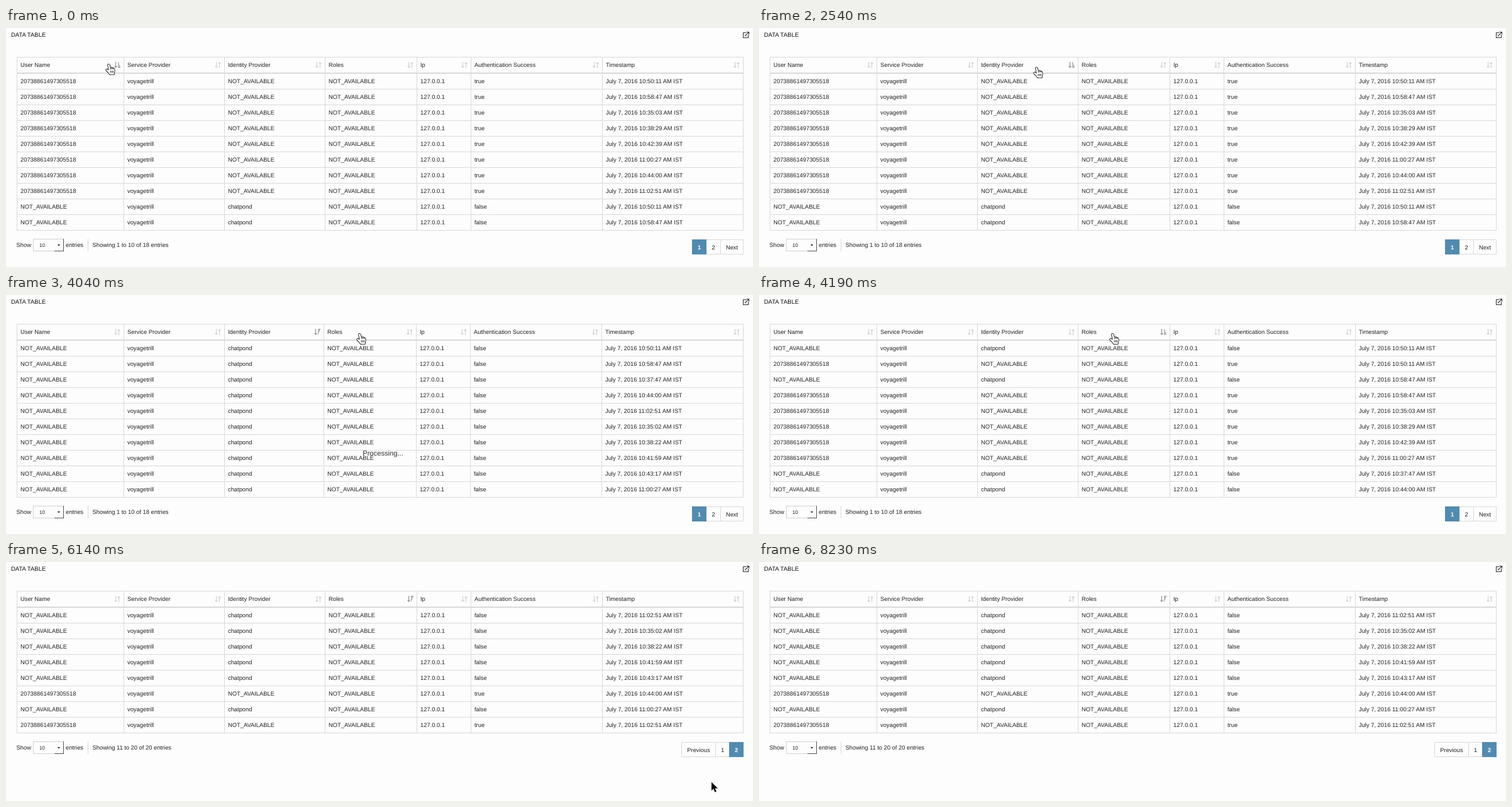
Write an HTML page with a canvas that moves like this. It is 1188 px wide and 381 px high and loops after 8530 ms.

```html
<!DOCTYPE html>
<html lang="en">
<head>
<meta charset="utf-8">
<title>Data table</title>
<style>
html, body { margin: 0; width: 100%; height: 100%; overflow: hidden; background: #fdfdfd; }
canvas { display: block; }
</style>
</head>
<body>
<canvas id="stage" width="1188" height="381"></canvas>
<script>
const ctx = document.getElementById('stage').getContext('2d');
const LOOP = 8530, STEP = 150;
const FONT = '"Liberation Sans", Arial, sans-serif';
const INK = '#222', LINE = '#dadada', PAPER = '#fdfdfd', BLUE = '#528bb0';
const NA = 'NOT_AVAILABLE';

const titles = ['User Name', 'Service Provider', 'Identity Provider', 'Roles', 'Ip',
  'Authentication Success', 'Timestamp'];
const wideEdges = [17, 187, 347, 507, 653, 739, 948, 1172];
const tightEdges = [17, 187, 347, 505, 652, 738, 947, 1172];

// Logins in natural order: u = known user, n = not available
const loginTimes = {
  u: '10:50:11 10:58:47 10:35:03 10:38:29 10:42:39 11:00:27 10:44:00 11:02:51'.split(' '),
  n: ('10:50:11 10:58:47 10:37:47 10:44:00 11:02:51 10:35:02 10:38:22 10:41:59 ' +
    '10:43:17 11:00:27').split(' ')
};
const seen = { u: 0, n: 0 };
const logins = [...'nunuuuuunnnnnnnunu'].map(kind => {
  const known = kind === 'u';
  return [known ? '20738861497305518' : NA, 'voyagetrill', known ? NA : 'chatpond', NA,
    '127.0.0.1', String(known), `July 7, 2016 ${loginTimes[kind][seen[kind]++]} AM IST`];
});
const knownRows = logins.filter(row => row[5] === 'true');
const unknownRows = logins.filter(row => row[5] === 'false');
const firstPage = logins.slice(0, 10), secondPage = logins.slice(10);
const knownFirst = [...knownRows, ...unknownRows].slice(0, 10);

const views = [
  { at: 0, rows: knownFirst, sorted: 0, asc: true },
  { at: 900, rows: firstPage, sorted: 1, asc: true },
  { at: 1490, rows: firstPage, sorted: 1 },
  { at: 2540, rows: knownFirst, sorted: 2, asc: true },
  { at: 3140, rows: unknownRows, sorted: 2, edges: tightEdges },
  { at: 4190, rows: firstPage, sorted: 3, asc: true },
  { at: 4640, rows: firstPage, sorted: 3 },
  { at: 5990, rows: secondPage, sorted: 3, last: true }
];
const busy = [[4040, 4190], [5840, 5990]];

// Cursor moves: start, number of steps, end point, shape, downward bow
const moves = [
  { at: 0, steps: 1, x: 158, y: 57, shape: hand },
  { at: 150, steps: 4, x: 263, y: 59, shape: hand },
  { at: 1190, steps: 1, x: 264, y: 59, shape: hand },
  { at: 1790, steps: 4, x: 436, y: 62, shape: hand, bow: 7 },
  { at: 3290, steps: 6, x: 557, y: 61, shape: hand },
  { at: 4940, steps: 2, x: 1094, y: 319, shape: arrow },
  { at: 5390, steps: 1, x: 1101, y: 329, shape: arrow },
  { at: 5540, steps: 2, x: 1117, y: 348, shape: hand },
  { at: 5990, steps: 2, x: 1121, y: 350, shape: arrow },
  { at: 6740, steps: 2, x: 759, y: 270, shape: arrow },
  { at: 7490, steps: 4, x: 1149, y: 371, shape: arrow },
  { at: 8230, steps: 1 }
];

function text(str, x, y, size = 9.35, color = INK, align = 'left', weight = '') {
  ctx.font = `${weight} ${size}px ${FONT}`;
  ctx.fillStyle = color;
  ctx.textAlign = align;
  ctx.fillText(str, x, y);
}

function box(x, y, w, h, color) {
  ctx.fillStyle = color;
  ctx.fillRect(x, y, w, h);
}

function frame(x, y, w, h, color) {
  ctx.strokeStyle = color;
  ctx.lineWidth = 1;
  ctx.strokeRect(x + 0.5, y + 0.5, w - 1, h - 1);
}

function path(d, fill, stroke, width = 1) {
  const p = new Path2D(d);
  if (stroke) {
    ctx.strokeStyle = stroke;
    ctx.lineWidth = width;
    ctx.stroke(p);
  }
  if (fill) {
    ctx.fillStyle = fill;
    ctx.fill(p);
  }
}

function hand() {
  path('M4 2.2Q4 .8 5.2 .8Q6.3 .8 6.8 2.2L8 6.4Q9 5.6 10 6.6Q11.4 6 12.2 7.2Q13.6 6.9 14.2 8.3' +
    'Q15.6 11.5 14.2 14L13.7 17.2H7.2Q5.4 14.2 3 12.3Q.6 10 1.3 9.2Q2.4 8.3 4 9.5L5.6 10.6Z',
    '#fff', '#000', 1.7);
  path('M8.2 11V14.5M10.3 11V14.5M12.3 11V14.5M8 6.4L8.5 9M10 6.6L10.4 9M12.2 7.2L12.5 9',
    null, '#000', 0.8);
}

function arrow() {
  path('M1 1V14.5L4.2 11.6L6.4 17L8.8 16L6.5 10.8H11Z', '#000', '#fff', 1.6);
}

function sortIcon(right, active, asc) {
  ctx.save();
  ctx.translate(right, 54);
  const color = active ? '#8c8c8c' : '#cfcfcf';
  path('M-12.5 0V9M-14.5 6.8L-12.5 9L-10.5 6.8', null, color, 1.1);
  if (active) {
    for (let i = 0; i < 4; i++) box(-9, i * 2.5, asc ? i + 1 : 4 - i, 1.5, color);
  } else {
    path('M-7.5 10V1M-9.5 3.2L-7.5 1L-5.5 3.2', null, color, 1.1);
  }
  ctx.restore();
}

function drawTable({ rows, sorted, asc, edges = wideEdges }) {
  const bottom = 72 + rows.length * 25;
  box(17, 46, 1156, 1, LINE);
  box(17, 71, 1156, 2, LINE);
  rows.forEach((row, i) => box(17, 97 + i * 25, 1156, 1, LINE));
  edges.forEach(x => box(x, 46, 1, bottom - 45, LINE));
  titles.forEach((title, c) => {
    text(title, edges[c] + 6, 62);
    sortIcon(edges[c + 1], c === sorted, asc);
    rows.forEach((row, r) => text(row[c], edges[c] + 6, 88 + r * 25));
  });
}

function button(label, x, w, current) {
  if (current) box(x, 337, w, 24, BLUE);
  else frame(x, 337, w, 24, LINE);
  text(label, x + w / 2, 353, 9.35, current ? '#fff' : INK, 'center', current ? 'bold' : '');
}

function drawFooter({ rows, last }) {
  ctx.save();
  ctx.translate(0, (rows.length - 10) * 25);
  text('Show', 16.5, 349);
  frame(43, 336, 49, 20, '#d2d2d2');
  box(77, 355, 15, 1, '#555');
  box(91, 336, 1, 20, '#555');
  text('10', 53, 349, 8);
  path('M82 345H86L84 347.5Z', '#111');
  text('entries', 95, 349);
  box(130, 336, 1, 20, LINE);
  text(`Showing ${last ? '11 to 20 of 20' : '1 to 10 of 18'} entries`, 137.5, 349);
  if (last) {
    button('Previous', 1074, 55);
    button('1', 1128, 23);
    button('2', 1150, 23, true);
  } else {
    button('2', 1113, 24);
    button('Next', 1136, 37);
    button('1', 1091, 23, true);
  }
  ctx.restore();
}

function drawHeading() {
  text('DATA TABLE', 8, 14, 9.5, '#111');
  path('M1177 7.5H1172.5V15.5H1180.5V11M1175 13L1181 7M1177.5 6.5H1181.5V10.5', null, '#333', 1.1);
}

function drawCursor(t) {
  const i = moves.findLastIndex(m => m.at <= t);
  const to = moves[i], from = moves[i - 1] || to;
  if (!to.shape) return;
  const k = Math.min(1, (Math.floor((t - to.at) / (STEP - 2)) + 1) / to.steps);
  const ease = k * k * (3 - 2 * k);
  const dip = (to.bow || 0) * Math.sin(Math.PI * k);
  ctx.save();
  ctx.translate(Math.round(from.x + (to.x - from.x) * ease),
    Math.round(from.y + (to.y - from.y) * ease + dip));
  to.shape();
  ctx.restore();
}

function draw(t) {
  const view = views.findLast(v => v.at <= t);
  box(0, 0, 1188, 381, PAPER);
  drawHeading();
  drawTable(view);
  drawFooter(view);
  if (busy.some(([start, end]) => t >= start && t < end)) {
    text('Processing...', 599.5, 256, 11.2, '#333', 'center');
  }
  drawCursor(t);
}

ctx.textRendering = 'geometricPrecision';
ctx.lineJoin = 'round';
const began = performance.now();
function tick() {
  draw((performance.now() - began) % LOOP);
  requestAnimationFrame(tick);
}
tick();
</script>
</body>
</html>
```
